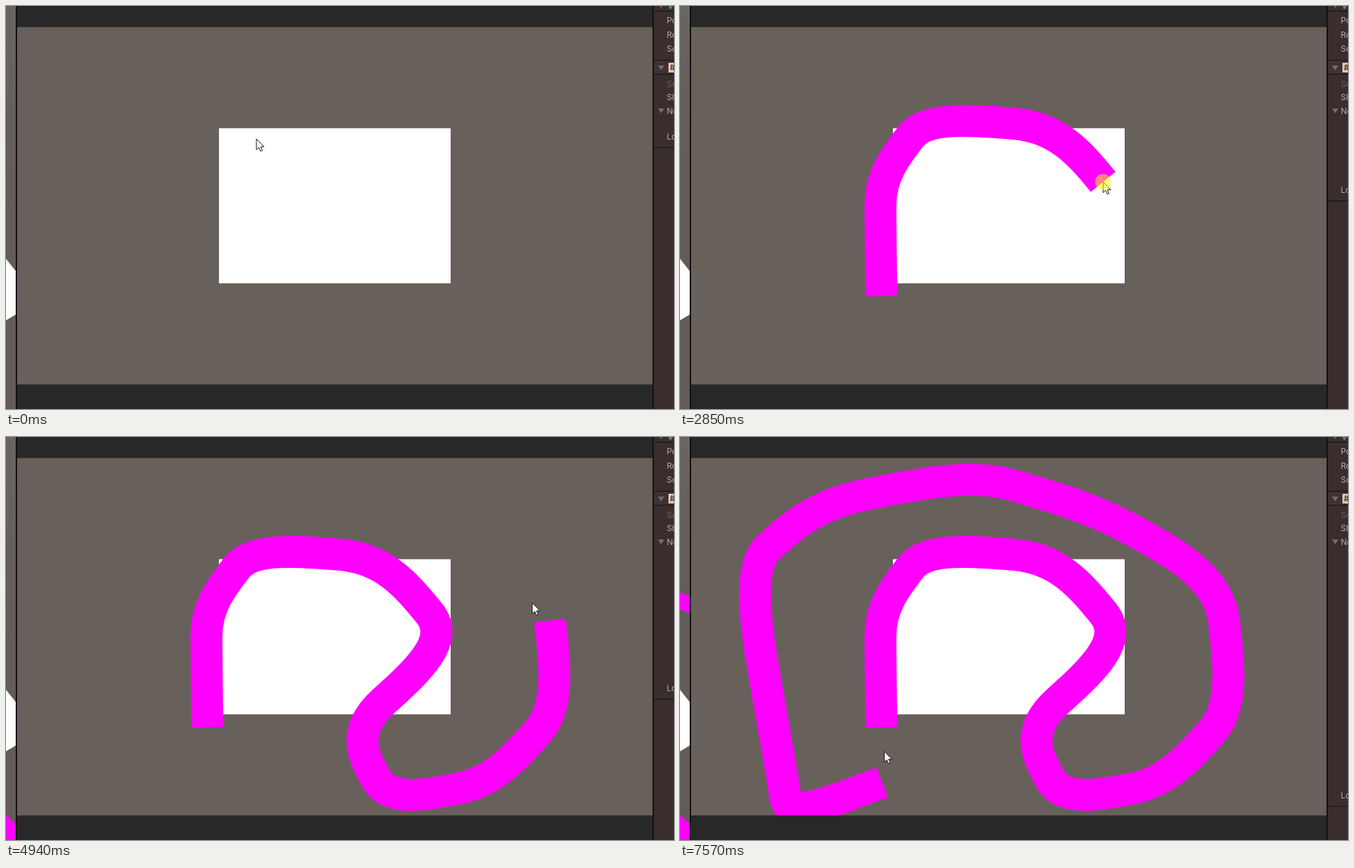
Recreate the animation shown at these times as an HTML page with a canvas. Size 963 by 582 pixels, loop 7.62 s.

```html
<!DOCTYPE html>
<html lang="en">
<head>
<meta charset="utf-8">
<title>Drawing a path</title>
<style>
  html, body { margin: 0; width: 100%; height: 100%; overflow: hidden; background: #282828; }
  canvas { display: block; }
</style>
</head>
<body>
<canvas id="stage" width="963" height="582"></canvas>
<script>
const ctx = document.getElementById('stage').getContext('2d');
const LOOP = 7620, ROW = 19.35;
const PINK = '#ff00ff', GROUND = '#68605b', EDGE = '#151111', DIM = '#756b69';

// Each click: time, x, y.
const clicks = [
  [700, 290.5, 419], [1270, 289, 288], [1930, 333, 188], [2420, 482, 170],
  [2780, 610, 254], [3270, 545, 381], [3650, 533, 493], [4050, 652.5, 507.5],
  [4450, 767, 425], [4790, 784, 265], [5140, 655, 136], [5490, 477.5, 69],
  [5840, 270, 82.5], [6140, 128, 159], [6450, 127, 374], [6700, 152.5, 523],
  [7080, 291.5, 498.5]
];

// The pointer rests at every click and strays a little between some of them.
const keys = [[0, 361, 192], [40, 361, 192], [450, 264, 375], [4250, 697, 486],
  [5630, 449, 71], [7570, 294.5, 454], [LOOP, 294.5, 454]];
for (const [t, x, y] of clicks) keys.push([t - 20, x, y], [t + 80, x, y]);
keys.sort((a, b) => a[0] - b[0]);

function slope(i, k) {
  const a = keys[i], b = keys[i + 1];
  return a && b ? (b[k] - a[k]) / (b[0] - a[0]) : 0;
}

function tangent(i, k) {
  const a = slope(i - 1, k), b = slope(i, k);
  return a * b > 0 ? 2 * a * b / (a + b) : 0;
}

// Monotone cubic interpolation of one coordinate.
function pointer(t, k) {
  let i = 0;
  while (i < keys.length - 2 && keys[i + 1][0] <= t) i++;
  const a = keys[i], b = keys[i + 1], span = b[0] - a[0];
  const u = (t - a[0]) / span, v = 1 - u;
  return a[k] * v * v * (1 + 2 * u) + b[k] * u * u * (3 - 2 * u)
    + span * u * v * (tangent(i, k) * v - tangent(i + 1, k) * u);
}

function box(color, x, y, w, h) {
  ctx.fillStyle = color;
  ctx.fillRect(x, y, w, h);
}

function shape(color, ...points) {
  ctx.beginPath();
  points.forEach(p => ctx.lineTo(...p));
  ctx.closePath();
  ctx.fillStyle = color;
  ctx.fill();
}

// Every new segment mirrors the last handle; its own end handle lies
// halfway between that mirrored handle and the new point.
function tracePath(count) {
  let [, x, y] = clicks[0], dx = -1, dy = -45;
  ctx.beginPath();
  ctx.moveTo(x, y);
  for (const [, nextX, nextY] of clicks.slice(1, count)) {
    const outX = x + dx, outY = y + dy;
    dx = (nextX - outX) / 2;
    dy = (nextY - outY) / 2;
    ctx.bezierCurveTo(outX, outY, nextX - dx, nextY - dy, nextX, nextY);
    x = nextX;
    y = nextY;
  }
}

function drawViewport(count) {
  box(GROUND, 16, 30.5, 916, 516);
  box('#fff', 307, 176.5, 334, 224);
  if (count < 2) return;
  ctx.save();
  ctx.beginPath();
  ctx.rect(16, 31, 916, 515);
  ctx.clip();
  tracePath(count);
  ctx.strokeStyle = PINK;
  ctx.lineWidth = 46;
  ctx.lineJoin = 'round';
  ctx.stroke();
  ctx.restore();
}

function drawLeftView(count) {
  const shade = ctx.createLinearGradient(0, 0, 0, 300);
  shade.addColorStop(0, '#6a6562');
  shade.addColorStop(1, '#625b57');
  box(shade, 0, 0, 15, 582);
  shape('#fff', [0, 365], [15, 384], [15, 445], [0, 454]);
  if (count >= 7) shape(PINK, [0, 545], [15, 560], [15, 582], [0, 582]);
  if (count >= 12) shape(PINK, [0, 224.5], [15, 229.5], [15, 255], [0, 249]);
  box('#111', 14, 0, 2, 582);
}

function drawInspector(rows) {
  const grow = Math.round(rows * ROW);
  box('#392d2d', 933, 0, 30, 582);
  box('#3d3232', 934, 79, 29, 20);
  box(EDGE, 932, 0, 2, 582);
  for (const y of [7, 78, 98, 204 + grow]) box(EDGE, 934, y, 29, 1);
  for (const y of [-4, 86, 148]) shape(DIM, [940, y], [949, y], [944.5, y + 7]);
  shape('#4f7fa8', [955, 0], [961, 0], [959, 4], [957, 5]);
  box('#f0c0b8', 955, 82, 8, 14);

  ctx.font = '12px Inter, Roboto, sans-serif';
  ctx.textBaseline = 'middle';
  const labels = { Po: 21.5, Ro: 42.5, Sc: 62, Sh: 132.5, No: 152, Lo: 189.5 + grow };
  ctx.fillStyle = '#b5adaa';
  for (const name in labels) ctx.fillText(name, 952.5, labels[name]);
  ctx.fillStyle = '#6e6361';
  ctx.fillText('Sc', 952.5, 113);
  ctx.fillStyle = '#3c4a24';
  ctx.font = 'bold ' + ctx.font;
  ctx.fillText('#', 957, 89.5);
}

const arrow = new Path2D('M0 0V15.5L3.6 12.2L6.2 17.8L8.6 16.7L6.1 11.3H11Z');

function drawPointer(t) {
  const x = pointer(t, 1), y = pointer(t, 2);
  ctx.save();
  ctx.translate(x, y);
  ctx.fillStyle = '#fff';
  ctx.fill(arrow);
  ctx.strokeStyle = '#111';
  ctx.lineWidth = 1;
  ctx.stroke(arrow);
  ctx.restore();
  if (clicks.some(c => t >= c[0] && t < c[0] + 120)) {
    ctx.beginPath();
    ctx.arc(x, y, 11.5, 0, 2 * Math.PI);
    ctx.fillStyle = 'rgba(255, 255, 0, .52)';
    ctx.fill();
  }
}

const begin = performance.now();

function draw() {
  const t = (performance.now() - begin) % LOOP;
  const clicked = lag => clicks.filter(c => c[0] + lag <= t).length;
  box('#282828', 0, 0, 963, 582);
  drawViewport(clicked(50));
  drawLeftView(clicked(50));
  drawInspector(clicked(180));
  drawPointer(t);
  requestAnimationFrame(draw);
}
draw();
</script>
</body>
</html>
```
